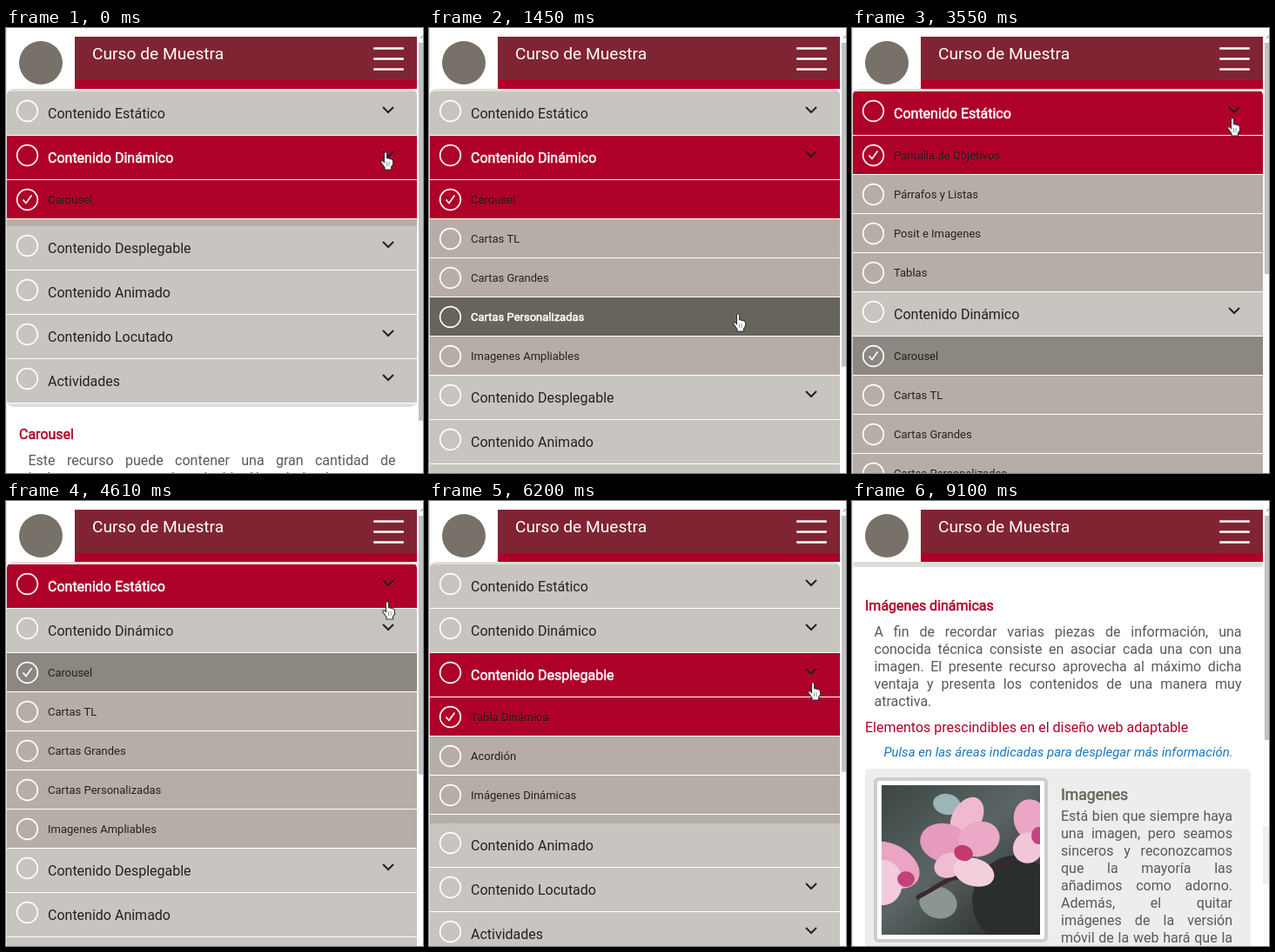
Write an HTML page with a canvas that moves like this. It is 479 by 512 pixels and loops after 9750 ms.

```html
<!DOCTYPE html>
<html lang="es">
<head>
<meta charset="utf-8">
<title>Curso de Muestra</title>
<style>
html, body { margin: 0; width: 100%; height: 100%; overflow: hidden; background: #fff; }
canvas { display: block; }
</style>
</head>
<body>
<canvas id="stage" width="479" height="512"></canvas>
<script>
const c = document.getElementById('stage').getContext('2d');
const LOOP = 9750, RED = '#ae0029', INK = '#222', BODY = '#595959';
const MAIN = '#c8c5c0', SUB = '#b6aea6', SEEN = '#8c8780', HOVER = '#66645b';

const ticks = [0, 120, 240, 360, 480, 630, 780, 930, 1050, 1170, 1320, 1450, 1570, 1690, 1810,
  1960, 2080, 2220, 2350, 2470, 2620, 2740, 2860, 3000, 3150, 3270, 3420, 3550, 4220, 4340,
  4490, 4610, 4740, 4860, 5140, 5260, 5380, 5530, 5650, 5770, 6050, 6200, 6330, 6460, 6610,
  6740, 6860, 6990, 7380, 7530, 7660, 7820, 8830, 8950, 9100];

// pointer path: time, x, y
const path = [[0, 430, 142], [360, 430, 142], [480, 420, 159], [630, 394, 193], [780, 383, 218],
  [1170, 365, 290], [1320, 357, 309], [1450, 349, 328], [1690, 349, 335], [1810, 351, 333],
  [2080, 385, 266], [2220, 405, 220], [2470, 427, 141], [2620, 429, 120], [2860, 431, 103],
  [4490, 431, 103], [4860, 433, 140], [5140, 433, 142], [5380, 436, 184], [5770, 435, 208],
  [6200, 435, 208], [6460, 430, 228], [6610, 425, 245], [6990, 393, 326], [7820, 393, 326],
  [8830, 425, 370], [8950, 467, 421]];

const CLICK = { dynOpen: -129, staOpen: 2985, staClose: 4200, dynClose: 5068, despOpen: 6010, pick: 7345 };

const menu = [
  { name: 'Contenido Estático', arrow: 1, items: ['Pantalla de Objetivos', 'Párrafos y Listas', 'Posit e Imagenes', 'Tablas'] },
  { name: 'Contenido Dinámico', arrow: 1, items: ['Carousel', 'Cartas TL', 'Cartas Grandes', 'Cartas Personalizadas', 'Imagenes Ampliables'] },
  { name: 'Contenido Desplegable', arrow: 1, items: ['Tabla Dinámica', 'Acordión', 'Imágenes Dinámicas', 'Botoneras', 'Procesos', 'Popup y Popover', 'Pestañas'] },
  { name: 'Contenido Animado', items: [] },
  { name: 'Contenido Locutado', arrow: 1, items: [] },
  { name: 'Actividades', arrow: 1, items: [] }
];

const pages = {
  'Pantalla de Objetivos': { size: 904, title: 'Pantalla de Objetivos', text: [] },
  'Carousel': { size: 599, title: 'Carousel', text: [
    'Este recurso puede contener una gran cantidad de',
    'imágenes en un espacio reducido. Usando los botones se',
    'pueden pasar las imágenes en modo cíclico. Los',
    'usuarios pueden avanzar o retroceder libremente por'] },
  'Tabla Dinámica': { size: 1000, title: 'Tabla dinámica', text: [
    'Este recurso permite presentar la información en una',
    'tabla de forma ordenada. Usando los botones se',
    'pueden desplegar los contenidos de cada una de las'] },
  'Imágenes Dinámicas': { size: 1668, title: 'Imágenes dinámicas', card: true, text: [
    'A fin de recordar varias piezas de información, una',
    'conocida técnica consiste en asociar cada una con una',
    'imagen. El presente recurso aprovecha al máximo dicha',
    'ventaja y presenta los contenidos de una manera muy',
    'atractiva.'] }
};
const cardText = ['Está bien que siempre haya', 'una imagen, pero seamos', 'sinceros y reconozcamos',
  'que la mayoría las', 'añadimos como adorno.', 'Además, el quitar', 'imágenes de la versión',
  'móvil de la web hará que la'];

const hand = new Path2D('M4.5 2Q6 -.5 7.5 2V7.5L13 9Q14.5 9.5 14.5 11.5V15L12.5 18V21H5V18.5L.7 12.5Q.5 10 3 11L4.5 12.5Z');

function swing(t, start) {
  const p = Math.min(1, Math.max(0, (t - start) / 400));
  return .5 - Math.cos(p * Math.PI) / 2;
}

function rect(x, y, w, h, fill, r = 0) {
  c.fillStyle = fill;
  c.beginPath();
  c.roundRect(x, y, w, h, r);
  c.fill();
}

function line(points, color, width) {
  c.beginPath();
  points.forEach(([x, y]) => c.lineTo(x, y));
  c.strokeStyle = color;
  c.lineWidth = width;
  c.stroke();
}

function blob(x, y, rx, ry, turn, fill) {
  c.fillStyle = fill;
  c.beginPath();
  c.ellipse(x, y, rx, ry, turn, 0, 7);
  c.fill();
}

function text(s, x, y, size, color, heavy, style = '') {
  c.font = `${style} ${size}px Roboto, sans-serif`;
  c.fillStyle = c.strokeStyle = color;
  c.fillText(s, x, y);
  if (heavy) {
    c.lineWidth = .5;
    c.strokeText(s, x, y);
  }
}

function justify(lines, x, y, width) {
  c.font = '16px Roboto, sans-serif';
  lines.forEach((s, i) => {
    const words = s.split(' ');
    const used = words.reduce((sum, w) => sum + c.measureText(w).width, 0);
    const gap = words.length > 1 ? (width - used) / (words.length - 1) : 0;
    let at = x;
    for (const w of words) {
      text(w, at, y + i * 20, 16, BODY);
      at += c.measureText(w).width + gap;
    }
  });
}

function ring(y, checked) {
  c.beginPath();
  c.arc(24.5, y, 11.8, 0, 7);
  c.strokeStyle = '#fff';
  c.lineWidth = 1.7;
  c.stroke();
  if (checked) line([[19.5, y], [23, y + 4], [29.5, y - 5]], '#fff', 1.7);
}

function pointer(t) {
  if (t >= 9100) return null;
  const i = path.findIndex(k => k[0] > t);
  if (i < 0) return path.at(-1).slice(1);
  const [t0, x0, y0] = path[i - 1], [t1, x1, y1] = path[i], p = (t - t0) / (t1 - t0);
  return [Math.round(x0 + (x1 - x0) * p), Math.round(y0 + (y1 - y0) * p)];
}

function stateAt(t) {
  const section = t < CLICK.staOpen ? 1 : t < CLICK.dynClose ? 0 : t < CLICK.despOpen ? 1 : 2;
  const page = t >= CLICK.pick ? 'Imágenes Dinámicas' : menu[section].items[0];
  const seen = new Set(['Carousel', page]);
  if (t >= CLICK.staOpen) seen.add('Pantalla de Objetivos');
  if (t >= CLICK.despOpen) seen.add('Tabla Dinámica');
  const open = [
    swing(t, CLICK.staOpen) - swing(t, CLICK.staClose),
    swing(t, CLICK.dynOpen) - swing(t, CLICK.dynClose),
    swing(t, CLICK.despOpen), 0, 0, 0];
  const heights = menu.map((m, i) => Math.round(open[i] * m.items.length * 45));
  const full = 383 + heights.reduce((a, b) => a + b);
  const bottom = Math.round(76 + (full - 76) * (1 - swing(t, CLICK.pick)));
  return { section, page, seen, heights, bottom };
}

function drawMenu(s, my) {
  c.save();
  c.beginPath();
  c.roundRect(1, 70, 471, s.bottom - 70, s.bottom < 80 ? 3 : 8);
  c.clip();
  rect(1, 70, 471, s.bottom - 70, '#dfdedb');
  let y = 73;
  if (s.bottom > 76) menu.forEach((m, i) => {
    const over = my >= y && my < y + 51;
    const lit = i === s.section || over;
    rect(1, y, 471, 50, lit ? RED : MAIN);
    rect(1, y + 50, 471, 1, '#fff');
    ring(y + 22.5);
    text(m.name, 48, y + 31, 16, lit ? '#fff' : INK, lit);
    if (m.arrow) line([[433, y + 18], [439, y + 24], [445, y + 18]], INK, 2);
    y += 51;
    drawItems(m, y, s.heights[i], s, my);
    y += s.heights[i];
  });
  c.restore();
}

function drawItems(m, top, height, s, my) {
  if (!height) return;
  const still = height === m.items.length * 45;
  c.save();
  c.beginPath();
  c.rect(1, top, 471, height);
  c.clip();
  m.items.forEach((name, i) => {
    const y = top + i * 45, seen = s.seen.has(name);
    const over = still && my >= y && my < y + 45;
    rect(1, y, 471, 44, over ? HOVER : name === s.page ? RED : seen ? SEEN : SUB);
    rect(1, y + 44, 471, 1, '#fff');
    ring(y + 22.5, seen);
    text(name, 48, y + 27, 13, over ? '#fff' : INK, over);
  });
  c.restore();
}

function drawPhoto(x, y) {
  c.save();
  c.beginPath();
  c.rect(x, y, 182, 172);
  c.clip();
  c.translate(x, y);
  const g = c.createLinearGradient(0, 0, 150, 172);
  g.addColorStop(0, '#3a4643');
  g.addColorStop(.5, '#5b6565');
  g.addColorStop(1, '#292b2b');
  rect(0, 0, 182, 172, g);
  blob(75, 22, 16, 12, .2, '#9db4b8');
  blob(65, 135, 22, 18, .3, '#8b9693');
  blob(150, 130, 45, 50, .4, '#2b2e2e');
  line([[40, 130], [78, 108], [130, 98], [182, 72]], '#3b2a2c', 5);
  // left, centre and right blooms
  blob(10, 92, 36, 24, .5, '#e9a5c3');
  blob(2, 112, 22, 26, 0, '#f3cbdc');
  blob(28, 108, 10, 9, 0, '#c2437c');
  blob(98, 38, 17, 26, .5, '#efb9d0');
  blob(72, 66, 28, 22, .2, '#e69abd');
  blob(112, 62, 24, 20, -.3, '#eba9c7');
  blob(78, 92, 18, 14, -.4, '#efbdd2');
  blob(106, 100, 24, 16, .3, '#f3cfdd');
  blob(94, 78, 11, 9, .3, '#c23a70');
  blob(172, 40, 20, 24, -.3, '#eba6c6');
  blob(168, 72, 17, 18, .4, '#f2c6d9');
  blob(180, 58, 8, 10, 0, '#c4467e');
  c.restore();
}

function drawPage(page, top) {
  c.save();
  c.translate(0, top);
  text(page.title, 15, 37, 16, RED, true);
  justify(page.text, 25.5, 67, 422);
  if (page.card) {
    text('Elementos prescindibles en el diseño web adaptable', 15, 177, 16, RED);
    c.textAlign = 'center';
    text('Pulsa en las áreas indicadas para desplegar más información.', 237, 205, 15, '#1878be', false, 'italic');
    c.textAlign = 'left';
    rect(15, 219, 443, 300, '#ededed', 6);
    rect(25, 229, 200, 190, '#cdcdcd', 6);
    rect(29, 233, 192, 182, '#fff', 2);
    drawPhoto(34, 238);
    text('Imagenes', 240, 255, 17.6, '#67635a', true);
    justify(cardText, 240, 279, 197);
  }
  c.restore();
}

function drawHeader() {
  rect(0, 0, 1, 512, '#dedede');
  rect(79, 10, 393, 50, '#802433');
  rect(79, 60, 393, 10, RED);
  blob(40, 40, 25, 25, 0, '#77716a');
  text('Curso de Muestra', 99, 36, 19.2, '#fff');
  for (const y of [23.5, 35.5, 47.5]) rect(422, y - 1.25, 35, 2.5, '#fff', 1);
}

function drawScrollbar(s, t) {
  rect(473, 0, 6, 512, '#fcfcfc');
  if (t >= 8950) rect(472, 374, 7, 67, '#f0f0f0');
  rect(474, 17, 5, 450000 / (pages[s.page].size + s.bottom), '#c1c1c1');
  line([[476, 12], [479, 9]], '#aaa', 1.5);
}

function frame(now) {
  const time = now % LOOP, t = ticks.findLast(k => k <= time);
  const s = stateAt(t), at = pointer(t);
  rect(0, 0, 479, 512, '#fff');
  drawPage(pages[s.page], Math.max(s.bottom, 89));
  drawMenu(s, at ? at[1] + 1 : -1);
  drawHeader();
  drawScrollbar(s, t);
  if (at) {
    c.save();
    c.translate(...at);
    c.fillStyle = '#fff';
    c.strokeStyle = '#333';
    c.lineWidth = 1.1;
    c.fill(hand);
    c.stroke(hand);
    line([[7.5, 12], [7.5, 17]], '#777', .8);
    line([[10, 12], [10, 17]], '#777', .8);
    c.restore();
  }
}

const start = performance.now();
(function loop() {
  frame(performance.now() - start);
  requestAnimationFrame(loop);
})();
</script>
</body>
</html>
```
